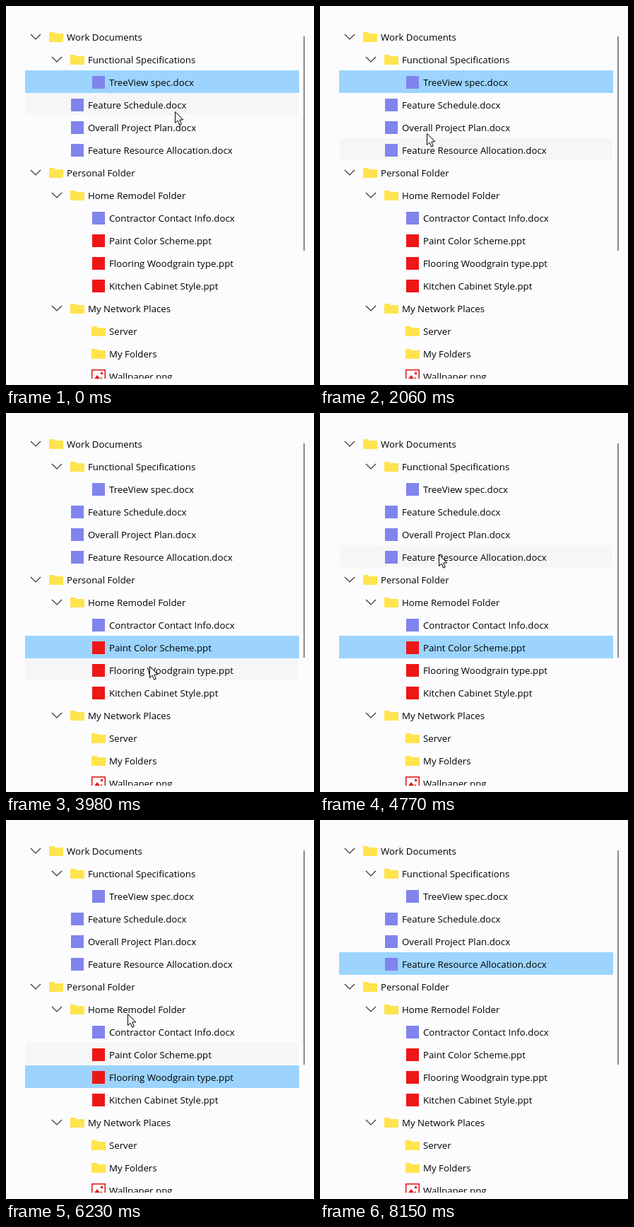
Animation of 436 by 536 pixels, one loop 8.69 s. Source, as an HTML page with a canvas:

```html
<!DOCTYPE html>
<html lang="en">
<head>
<meta charset="utf-8">
<title>Tree view selection</title>
<style>
  html, body { margin: 0; width: 100%; height: 100%; overflow: hidden; background: #fcfcfe; }
  canvas { display: block; }
</style>
</head>
<body>
<canvas id="stage" width="436" height="536"></canvas>
<script>
const ctx = document.getElementById('stage').getContext('2d');
const LOOP = 8690, ROW = 32, TOP = 27, INDENT = 30, HOVER_LAG = 130;
const PAPER = '#fcfcfe', RED = '#e01414';

// One leading space per level
const rows = `Work Documents
 Functional Specifications
  TreeView spec.docx
 Feature Schedule.docx
 Overall Project Plan.docx
 Feature Resource Allocation.docx
Personal Folder
 Home Remodel Folder
  Contractor Contact Info.docx
  Paint Color Scheme.ppt
  Flooring Woodgrain type.ppt
  Kitchen Cabinet Style.ppt
 My Network Places
  Server
  My Folders
  Wallpaper.png`.split('\n').map(line => {
  const label = line.trim();
  return { label, depth: line.length - label.length, type: label.split('.')[1] || 'folder' };
});

const home = { x: 239, y: 149 };
const move = (start, end, x, y) => ({ start, end, x, y });
const moves = [
  move(860, 1260, 144, 185),
  move(1260, 1600, 150, 229),
  move(1600, 2400, 151, 149),
  move(2790, 3380, 200, 325),
  move(3650, 3900, 203, 358),
  move(4100, 4770, 168, 200),
  move(5040, 5100, 176, 334),
  move(5240, 5640, 186, 364),
  move(5970, 6460, 160, 200),
  move(6900, 7300, 178, 388),
  move(7300, 7760, 170, 204),
  move(7820, 8020, 190, 545)
];
const clicks = [2400, 3650, 5970, 7800];

const ease = p => p * p * (3 - 2 * p);

function pointerAt(t) {
  let { x, y } = home;
  for (const m of moves) {
    if (t < m.start) break;
    const e = ease(Math.min(1, (t - m.start) / (m.end - m.start)));
    x += (m.x - x) * e;
    y += (m.y - y) * e;
  }
  return { x: Math.round(x), y: Math.round(y) };
}

const rowAt = t => Math.floor((pointerAt(t).y - TOP - 1) / ROW);

function rect(color, x, y, w, h) {
  ctx.fillStyle = color;
  ctx.fillRect(x, y, w, h);
}

const arrow = new Path2D('M0 0V16L3.6 12.6 6.2 18.6 8.8 17.5 6.3 11.6 11.3 11.3Z');
const chevron = new Path2D('M-26 -4L-19 3L-12 -4');
const hills = new Path2D('M2 6L8 -2 12 3 14 1 18 6Z');

const icons = {
  folder() {
    rect('#ffe44e', 0, -7, 8, 3);
    rect('#ffe44e', 0, -5, 20, 12);
  },
  docx() { rect('#8084ec', 1, -9, 18, 18); },
  ppt() { rect('#ee1616', 1, -9, 18, 18); },
  png() {
    rect(RED, 0, -10, 20, 20);
    rect(PAPER, 1.5, -8.5, 17, 17);
    rect(RED, 13, -6, 3, 3);
    ctx.fill(hills);
  }
};

function drawRow({ label, depth, type }, i) {
  ctx.save();
  ctx.translate(61 + depth * INDENT, TOP + 17 + i * ROW);
  icons[type]();
  const expanded = rows[i + 1]?.depth > depth;
  ctx.strokeStyle = '#333';
  ctx.lineWidth = 1.2;
  if (expanded) ctx.stroke(chevron);
  ctx.fillStyle = '#000';
  ctx.fillText(label, 25, 5);
  ctx.restore();
}

function drawPointer({ x, y }) {
  ctx.save();
  ctx.translate(x + 0.5, y + 0.5);
  ctx.fillStyle = '#fff';
  ctx.fill(arrow);
  ctx.strokeStyle = '#000';
  ctx.lineWidth = 1;
  ctx.stroke(arrow);
  ctx.restore();
}

function draw(t) {
  const clicked = clicks.findLast(c => c <= t);
  const selected = clicked ? rowAt(clicked) : 2;
  const hovered = rowAt(t - HOVER_LAG);

  rect(PAPER, 0, 0, 436, 536);
  ctx.save();
  ctx.beginPath();
  ctx.rect(0, 0, 436, 527);
  ctx.clip();
  rect('#f6f6f6', 28, TOP + hovered * ROW, 386, ROW - 1);
  rect(hovered === selected ? '#84bdec' : '#9cd4fe', 27, TOP + selected * ROW, 388, ROW);
  ctx.font = '13.25px "Open Sans", "Noto Sans", sans-serif';
  rows.forEach(drawRow);
  ctx.restore();

  rect('#8a8a8a', 421, 43, 2, 303);
  drawPointer(pointerAt(t));
}

const start = performance.now();
function tick() {
  draw((performance.now() - start) % LOOP);
  requestAnimationFrame(tick);
}
tick();
</script>
</body>
</html>
```
